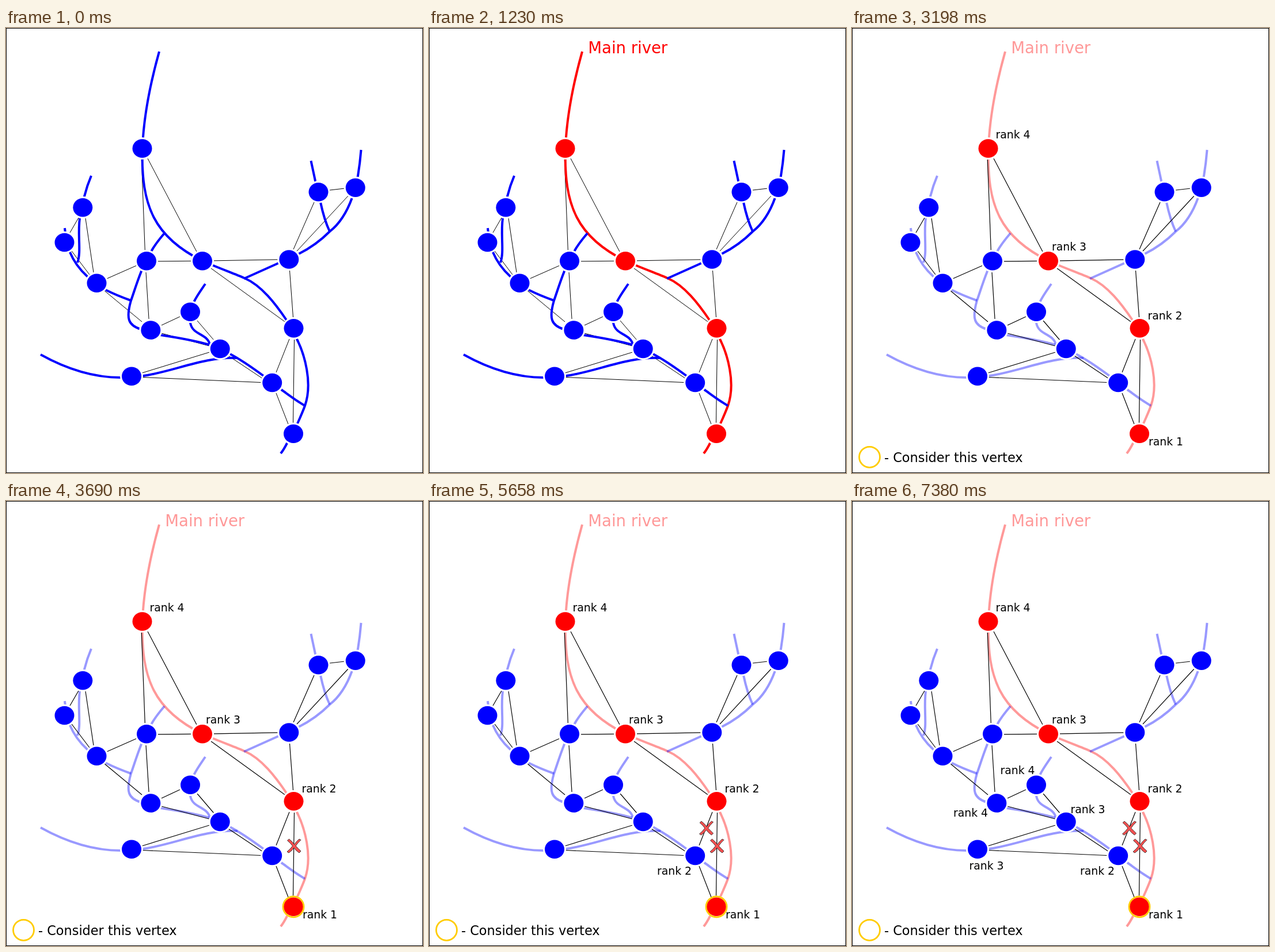
An HTML page that plays this animation: 724 by 774 pixels, repeating every 8 s.

```html
<!DOCTYPE html>
<html lang="en">
<head>
<meta charset="utf-8">
<title>River ranks</title>
<style>
html, body { margin: 0; width: 100%; height: 100%; overflow: hidden; background: #fff; }
svg { display: block; width: 724px; height: 774px; }
text { font-family: "DejaVu Sans", sans-serif; }
.river { fill: none; stroke: #00f; stroke-width: 4; }
.rank { font-size: 18.8px; }
.ring { fill: none; stroke: #fc0; stroke-width: 2.8; }
</style>
</head>
<body>
<svg id="stage" viewBox="0 0 724 774">
  <rect width="724" height="774" fill="#fff"/>
  <g id="rivers"></g>
  <path id="edges" fill="none" stroke="#000" d="M235.3 229L241.3 387M246 227L331 389M263 405.8L321 405.3M361 404.8L472 402.8M492.5 422L498.5 503M356 418L485 511.5M499 385L535 303M505 388L594 292M562 282L588 279M126 330L111 356M138 331L152 425M114 388L145 429M175 436L227 413M171 457L236 511M243 425L248 506M270 517L302 502M332 509L361 543M270 531L353 553M353 564L236 600M237 607.5L443 616.5M386 570L446 610M469 599L492 541M500.5 542L498.5 687M469 635L490 689"/>
  <g id="nodes"></g>
  <text id="title" x="276.3" y="44" font-size="27.5" fill="#f00">Main river</text>
  <g id="legend">
    <circle class="ring" cx="30.5" cy="746.3" r="18"/>
    <text x="56" y="755" font-size="22.4">- Consider this vertex</text>
  </g>
  <circle id="ring" class="ring" cx="499" cy="705.8" r="18"/>
  <g id="marks"></g>
  <rect x=".5" y=".5" width="723" height="773" fill="none" stroke="#000"/>
</svg>
<script>
const STEP = 1230, LOOP = 8000;
const $ = id => document.getElementById(id);

function add(parent, tag, attrs, text) {
  const el = document.createElementNS("http://www.w3.org/2000/svg", tag);
  for (const k in attrs) el.setAttribute(k, attrs[k]);
  if (text) el.textContent = text;
  $(parent).appendChild(el);
  return el;
}

// The first river is the main one.
const rivers = [
  "M266 41C250 98 239 155 236.8 209C234 310 258 364 341 405C365 416 396 427 414 435C444 448 468 480 487 508L499.5 522.5L505 541C518 567 533 617 519 657C515 668 510 679 506 688L488 722C485 728 481 735 477 740",
  "M275 357C264 370 257 379 252 389L235 423C227 443 222 460 217 474C208 505 212 517 234 524L268 534C295 538 325 543 353 551L389 567C410 578 428 591 447 605L478 629C492 639 505 649 519 657",
  "M102 348L103 357L111 390C118 407 128 420 141 432L174 456C190 464 203 469 217 474",
  "M148 257C142 271 139 281 136 293L128 331C124 360 131 390 124 408",
  "M346 445C338 457 332 465 327 475L320 513C324 535 350 531 354 551",
  "M60 568C105 593 150 608 199 608L238 605C290 598 345 571 402 574",
  "M529.5 231L537 266L546 303C550 322 555 339 562 354",
  "M616.5 212C615 230 613 245 611 257L601 295C592 320 580 340 562 354C545 371 528 383 508 393L473 409L413 436"
].map(d => add("rivers", "path", { class: "river", d }));

// The first four vertices lie on the main river.
const nodes = [
  [236.5, 209.5], [341, 405.3], [499.5, 522.3], [499, 705.8],
  [244, 405.3], [491.3, 402.5], [542.5, 285.2], [606.7, 277.8],
  [133.3, 312.3], [101.5, 373], [157.5, 443.7], [251.3, 525.5],
  [320, 493.8], [371.7, 558], [218, 605.8], [462.2, 617]
].map(([cx, cy]) => {
  add("nodes", "ellipse", { cx, cy, rx: 20, ry: 19.3, fill: "#fff" });
  return add("nodes", "ellipse", { cx, cy, rx: 17, ry: 16.3, fill: "#00f" });
});

// Each mark appears from its step on.
const marks = [];
function rank(from, n, x, y) {
  marks.push([from, add("marks", "text", { class: "rank", x, y }, "rank " + n)]);
}
function cross(from, x, y) {
  marks.push([from, add("marks", "path", {
    transform: `translate(${x} ${y})`, fill: "#ff5050", stroke: "#433",
    d: "M-11.5-9.5L-8.5-12Q-2-7 .5-2.5Q4-8 9-12L12-10.5Q6-5 3 0Q7 4 12 9L9 12Q3 8 0 3Q-3 8-9 12L-12 10Q-6 5-2.5 0Q-6-5-11.5-9.5Z"
  })]);
}
rank(2, 4, 249.5, 192);
rank(2, 3, 347, 387);
rank(2, 2, 513.5, 507);
rank(2, 1, 515, 726);
cross(3, 500, 600);
cross(4, 481.5, 569);
rank(4, 2, 396, 649.5);
rank(5, 3, 379.5, 543);
rank(5, 3, 203.5, 640.5);
rank(6, 4, 257.5, 474.5);
rank(6, 4, 176, 549);
marks.push([2, $("legend")], [3, $("ring")], [1, $("title")]);

function draw(t) {
  const step = Math.floor((t % LOOP) / STEP);
  const faded = step > 1;
  const main = step > 0 ? "#f00" : "#00f";
  rivers[0].style.stroke = main;
  for (const r of rivers) r.style.opacity = faded ? .4 : 1;
  $("title").style.opacity = faded ? .4 : 1;
  nodes.slice(0, 4).forEach(n => n.setAttribute("fill", main));
  $("edges").style.strokeWidth = faded ? 1.2 : 1;
  // Rivers cover the edges until they fade.
  $("stage").insertBefore($("rivers"), faded ? $("edges") : $("nodes"));
  for (const [from, el] of marks) el.style.display = step >= from ? "" : "none";
}

const start = performance.now();
function tick() {
  draw(performance.now() - start);
  requestAnimationFrame(tick);
}
tick();
</script>
</body>
</html>
```
